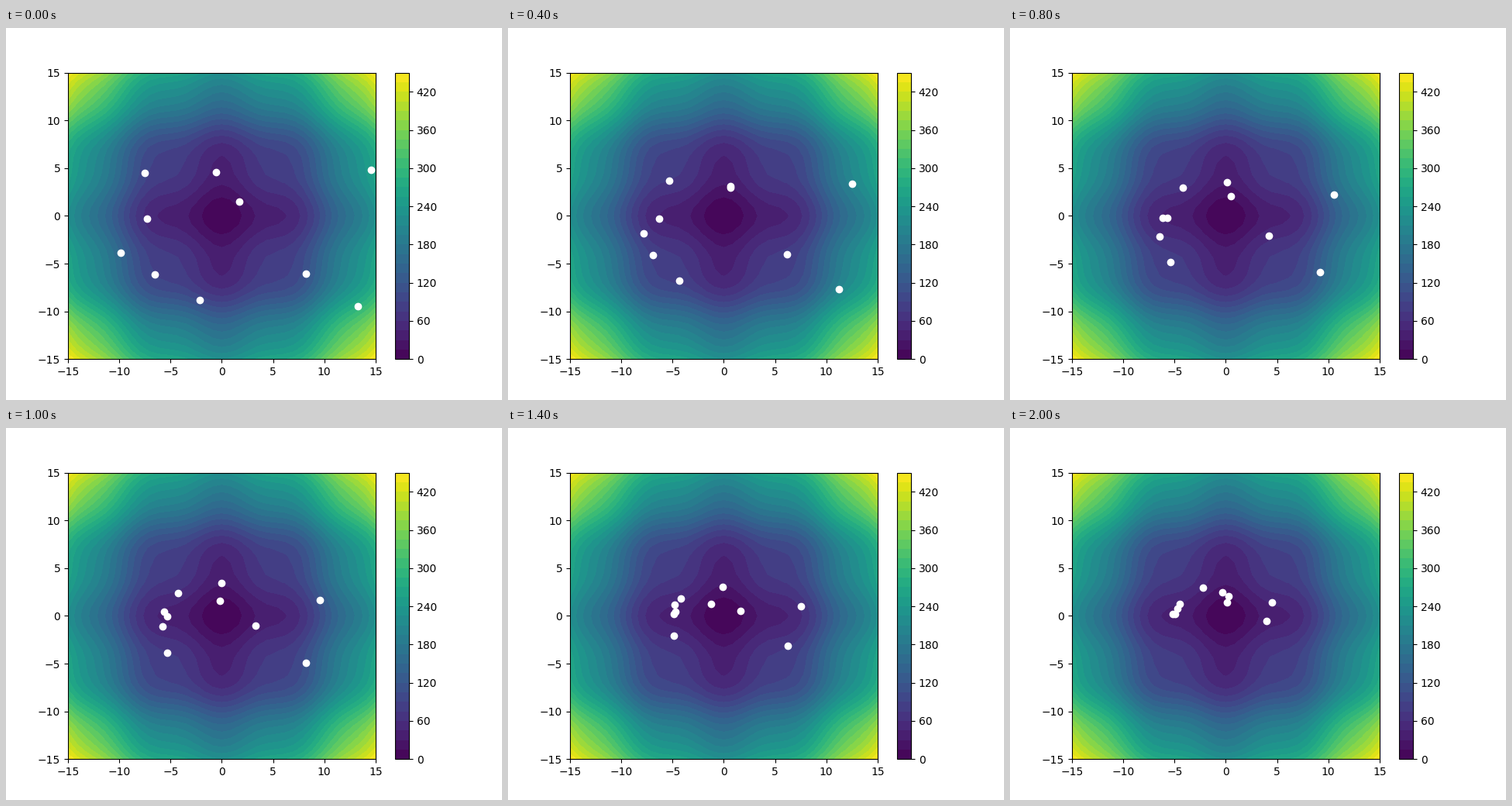
A matplotlib script for the animation above (2100 ms loop, 640 px wide and 480 px high).

```python
import numpy as np
import matplotlib.pyplot as plt
from matplotlib.animation import FuncAnimation

LIMIT = 15
FRAMES, INTERVAL = 21, 100
MAX_STEP = 0.5  # fastest move per frame along one axis

# Each particle: its start, two turning points and its end, as (x, y)
KEYS = np.array([0, 6, 14, 20])
PATHS = np.array([
    [(-7.48, 4.46), (-4.49, 3.46), (-4.19, 1.78), (-2.22, 2.95)],
    [(-0.56, 4.58), (0.80, 2.59), (-1.24, 1.25), (-0.33, 2.47)],
    [(14.56, 4.82), (11.54, 2.82), (7.53, 1.00), (4.51, 1.41)],
    [(1.71, 1.49), (0.35, 3.32), (-0.10, 3.04), (0.27, 2.06)],
    [(-7.29, -0.29), (-6.08, -0.29), (-4.87, 0.19), (-5.17, 0.19)],
    [(-9.86, -3.86), (-6.91, -0.90), (-4.79, 1.17), (-4.49, 1.25)],
    [(-6.53, -6.14), (-6.83, -3.17), (-4.68, 0.40), (-4.72, 0.76)],
    [(-2.15, -8.81), (-5.17, -5.81), (-4.87, -2.08), (-4.94, 0.19)],
    [(8.21, -6.06), (5.19, -3.05), (1.63, 0.52), (0.12, 1.41)],
    [(13.31, -9.46), (10.24, -6.79), (6.28, -3.13), (3.98, -0.54)],
])


def limit(speed):
    return np.clip(speed, -MAX_STEP, MAX_STEP)


# Speeds at the key points; every particle sets off as fast as it may
SPEEDS = limit(np.gradient(PATHS, KEYS, axis=1))
SPEEDS[:, 0] = limit(3 * (PATHS[:, 1] - PATHS[:, 0]) / KEYS[1])


def ripple(v):
    """Parabola with a cosine ripple, zero at the centre."""
    return v**2 + 10 * (1 - np.cos(2 * np.pi * v / 7.5))


def swarm(frame):
    """Cubic Hermite position of every particle."""
    i = min(np.searchsorted(KEYS, frame, side="right"), len(KEYS) - 1)
    span = KEYS[i] - KEYS[i - 1]
    t = (frame - KEYS[i - 1]) / span
    ease = t * t * (3 - 2 * t)
    bend = (1 - t) * SPEEDS[:, i - 1] - t * SPEEDS[:, i]
    return (PATHS[:, i - 1] * (1 - ease) + PATHS[:, i] * ease
            + span * t * (1 - t) * bend)


fig, ax = plt.subplots(figsize=(6.4, 4.8), dpi=100)
side = np.linspace(-LIMIT, LIMIT, 35)
X, Y = np.meshgrid(side, side)
field = ax.contourf(X, Y, ripple(X) + ripple(Y), levels=np.arange(0, 451, 15))
fig.colorbar(field, ax=ax, ticks=np.arange(0, 421, 60))
ax.set(xlim=(-LIMIT, LIMIT), ylim=(-LIMIT, LIMIT))
dots, = ax.plot([], [], "o", color="white")


def update(frame):
    dots.set_data(*swarm(frame).T)
    return dots,


anim = FuncAnimation(fig, update, frames=FRAMES, interval=INTERVAL,
                     repeat=True, repeat_delay=0)
plt.show()
```
